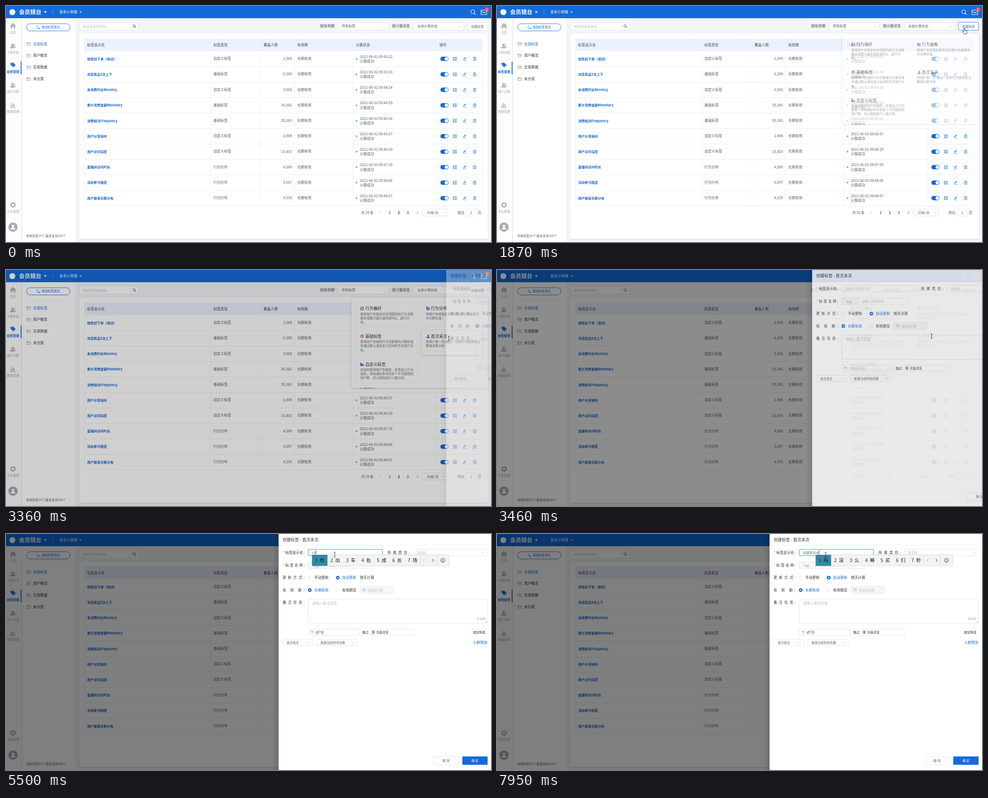
Write an HTML page that moves like this. It is 1073x522 px and loops after 8 s.

```html
<!DOCTYPE html>
<html>
<head>
<meta charset="utf-8">
<title>标签管理</title>
<style>
html, body { margin: 0; width: 100%; height: 100%; overflow: hidden; background: #f4f5f6; }
svg { display: block; width: 1073px; height: 522px; }
text { font-family: "Noto Sans CJK SC", "Noto Sans CJK", "Noto Sans", sans-serif; white-space: pre; }
</style>
</head>
<body>
<svg id="stage" viewBox="0 0 1073 522"></svg>
<script>
const BLUE = '#136bdb', INK = '#55585e', DARK = '#303133', HINT = '#b9bdc5', LINE = '#dcdfe6', GREY = '#b4b6ba';
const LOOP = 8000;

// Text is placed by its left (or anchor) x and its vertical middle.
const text = (x, y, s, size = 7.8, fill = INK, more = '') =>
  `<text x="${x}" y="${y + size * 0.37}" font-size="${size}" fill="${fill}" ${more}>${s}</text>`;
const BOLD = 'font-weight="700"', MID = 'text-anchor="middle"', END = 'text-anchor="end"';
const rect = (x1, y1, x2, y2, fill = '#fff', stroke = 'none', r = 0, more = '') =>
  `<rect x="${x1}" y="${y1}" width="${x2 - x1}" height="${y2 - y1}" fill="${fill}" stroke="${stroke}" rx="${r}" ${more}/>`;
const field = (x1, y1, x2, y2, fill = '#fff', more = '') =>
  rect(x1 + 0.5, y1 + 0.5, x2 - 0.5, y2 - 0.5, fill, LINE, 1.5, `stroke-width=".8" ${more}`);
const line = (d, stroke = INK, w = 0.9, more = '') =>
  `<path d="${d}" fill="none" stroke="${stroke}" stroke-width="${w}" ${more}/>`;
const shape = (d, fill, more = '') => `<path d="${d}" fill="${fill}" ${more}/>`;
const dot = (x, y, r, fill, more = '') => `<circle cx="${x}" cy="${y}" r="${r}" fill="${fill}" ${more}/>`;
const group = (id, body, more = '') => `<g id="${id}" ${more}>${body}</g>`;
const at = (x, y, body) => `<g transform="translate(${x} ${y})">${body}</g>`;
const chevron = (x, y, fill = '#b4b8c0') => line(`M${x - 2.7} ${y - 1.2}l2.7 2.6 2.7-2.6`, fill, 0.8);
const spread = (x, y, s, pitch, size = 7.8) =>
  [...s].map((c, i) => text(x + i * pitch, y, c, size, DARK)).join('');
const calendar = (x, y) => line(`M${x - 2.8} ${y - 2.3}h5.6v5h-5.6zM${x - 2.8} ${y - 0.5}h5.6M${x - 1.3} ${y - 3.2}v1.6M${x + 1.3} ${y - 3.2}v1.6`, '#a9adb5', 0.7);
const lens = (x, y, r, stroke, w) =>
  `<circle cx="${x}" cy="${y}" r="${r}" fill="none" stroke="${stroke}" stroke-width="${w}"/>` +
  line(`M${x + r * 0.7} ${y + r * 0.7}l${r * 0.8} ${r * 0.8}`, stroke, w * 1.3);
const person = (x, y, k, fill) => at(x, y, `<g transform="scale(${k})">` + dot(0, -2.4, 2.7, fill) + shape('M-5 5.2c0-6.4 10-6.4 10 0z', fill) + '</g>');

function header() {
  return rect(0, 0, 1073, 27, BLUE) + dot(14, 13.5, 6.6, '#fff') +
    text(29, 13.5, '会员镜台', 12.3, '#fff', BOLD) + shape('M83.5 11.8h7l-3.5 3.6z', '#fff') +
    rect(103.5, 8, 104.3, 19, '#6ba4ee') +
    text(118, 13.5, '青禾小商铺', 7.9, '#fff', 'font-weight="500"') + shape('M162.5 12.3h5l-2.5 2.6z', '#fff') +
    lens(1032.5, 12.7, 4.2, '#fff', 1.1) +
    line('M1051 9h12.5v10h-12.5zM1051 13h4l1 1.6h3l1-1.6h3.5', '#fff', 1.1) +
    dot(1064, 8, 5, '#f4545b') + text(1064, 8, '1', 7, '#fff', MID);
}

function rail() {
  const tag = shape('M-6-4.5l5-1.5 5.6 5.6-4.4 4.6-5.8-5.6z', BLUE) + line('M0-6l6 5.8-4.6 5', BLUE, 1) + dot(-3, -2.7, 0.9, '#fff');
  const pair = person(2.5, 0, 0.85, '#cfd0d3') + person(-1.5, 0.3, 1, GREY);
  const bars = line('M-4.5 4.5v-5M-1-4.5v9M2.5 4.5v-6', GREY, 2.2) + line('M-6.5 5.8h13', GREY, 1.2);
  const house = shape('M0-6.5l7 6.3h-2v6.2h-3.5v-4h-3v4H-5V-.2h-2z', GREY);
  const gear = `<circle r="4" fill="none" stroke="${GREY}" stroke-width="2.8"/><circle r="5.6" fill="none" stroke="${GREY}" stroke-width="1.8" stroke-dasharray="2.93"/>`;
  const items = [[44, house, '主页'], [88, pair, '人群实验'], [131, tag, '标签管理'], [175, pair, '用户分群'], [219, bars, '数据管理'], [440, gear, '平台管理']];
  return rect(0, 27, 34, 522, '#fcfcfc') + rect(34, 27, 35.5, 522, '#e4e5e7') +
    items.map(([y, icon, name], i) => at(15.5, y, icon) +
      text(15.5, y + 14.3, name, 6.8, i == 2 ? BLUE : '#a3a5a9', MID + (i == 2 ? ' ' + BOLD : ''))).join('') +
    rect(32.5, 123, 34.3, 151, BLUE) + dot(15.5, 489, 10.3, '#aaacb1') + person(15.5, 489, 1, '#fff');
}

function sidebar() {
  const names = ['全部标签', '用户概览', '交易数据', '未分类'];
  return rect(35.5, 27, 153, 522, '#fff') +
    rect(45.5, 39.2, 141.7, 55.2, '#fff', BLUE, 8, 'stroke-width=".9"') +
    line('M72 44h-3.2v5.6h5.4v-3M72.5 49.6h3M74 48v3', BLUE, 0.7) + text(79, 47, '增加标签类目', 6.7, BLUE) +
    rect(46, 66.8, 142, 67.5, '#ebedf0') +
    names.map((n, i) => {
      const y = 83.7 + i * 25.8;
      return line(`M46.2 ${y - 3.3}h2.8l1 1.3h3.8v5.4h-7.6zM46.2 ${y - 0.8}h7.6`, i ? '#777a80' : '#6c7c94', 0.7) + text(60, y, n, 7.9, i ? DARK : BLUE);
    }).join('') + text(45, 509, '有效标签29个/最多支持200个', 6.6, INK);
}

const ROW = 34.23, rowTop = i => 99.8 + i * ROW;
const rows = [
  ['按性别下单（测试）', 0, '2,569', '43:22'], ['浏览商品5次上下', 1, '6,285', '43:53'],
  ['未消费时长Recency', 0, '3,565', '44:24'], ['累计消费金额Monetary', 1, '35,381', '44:55'],
  ['消费频次Frequency', 1, '35,381', '45:26'], ['用户分享倾向', 0, '1,908', '45:57'],
  ['用户访问深度', 0, '15,453', '46:29'], ['直播间访问时长', 2, '4,585', '47:35'],
  ['活动参与程度', 2, '5,697', '48:06'], ['用户登录天数分布', 2, '4,535', '48:37']];
const kinds = ['自定义标签', '基础标签', '行为分布'];

function rowTools(y) {
  return rect(961, y - 4.8, 979, y + 4.8, BLUE, 'none', 4.8) + dot(974.2, y, 3.8, '#fff') +
    at(993, y, line('M-3.6-3.5h2.6v2.6h-2.6zM1-3.5h2.6v2.6H1zM-3.6 1h2.6v2.6h-2.6zM1 1h2.6v2.6H1z', BLUE, 0.8)) +
    at(1014.5, y, line('M-3.6 3.8h7.4', BLUE, 0.7) + shape('M-3 2.2l.6-2.2 4.4-3.8 1.4 1.5-4.2 4z', BLUE, 'opacity=".75"')) +
    at(1036.8, y, line('M-3.6-2.2h7.2M-1.3-2.4v-1.2h2.6v1.2M-2.8-2v5.6h5.6v-5.6M-1-.4v2.6M1-.4v2.6', BLUE, 0.75));
}

function table() {
  const heads = [[179.5, '标签显示名'], [459, '标签类型'], [570, '覆盖人数'], [644.5, '有效期'], [774, '计算状态'], [959, '操作']];
  const body = rows.map(([name, kind, count, time], i) => {
    const y = 116.9 + i * ROW;
    return text(179.5, y, name, 7.3, '#1663cf', BOLD) + text(459, y - 0.7, kinds[kind]) +
      text(633, y - 0.7, count, 8, INK, END) + text(644.5, y - 0.7, '长期有效') +
      dot(775.5, y, 1.7, '#2fc18f') + text(783, y - 5, '2021-06-02 09:' + time) + text(783, y + 5.2, '计算成功') +
      rowTools(y) + rect(174, rowTop(i + 1) - 0.4, 1054, rowTop(i + 1) + 0.4, '#e6e9ef');
  }).join('');
  const bottom = rowTop(10);
  return rect(162, 61, 1066, 515, '#fff', 'none', 1, 'filter="url(#soft)"') + rect(174, 72, 1054, 99.8, '#ebf1fd') +
    rect(174, 0, 1054, ROW, '#f5f7fa', 'none', 0, 'id="hover"') +
    [174, 453, 564, 638, 768, 953, 1054].map(x => rect(x - 0.4, 72, x + 0.4, bottom, '#ebeef4')).join('') +
    heads.map(([x, s]) => text(x, 86, s, 7.8, '#44474d', 'font-weight="500"')).join('') + body;
}

function pager() {
  return text(786, 457, '共 29 条', 7.6) + line('M828.8 454.3l-2.7 2.7 2.7 2.7', '#b4b8c0', 0.9) +
    [1, 2, 3].map(n => text(829 + n * 20, 456.7, n, 7.6, n == 2 ? DARK : '#2560b8', MID + ' ' + BOLD)).join('') +
    line('M909 454.3l2.7 2.7-2.7 2.7', INK, 0.9) + field(921, 448.5, 978, 465) + text(931, 457, '10条/页', 7.4) + chevron(969.5, 457) +
    text(999, 457, '前往', 7.6) + field(1016, 448.5, 1042, 465) + text(1029, 457, '1', 7.6, INK, MID) + text(1044, 457, '页', 7.6);
}

function toolbar() {
  return field(162, 35.5, 293.5, 54) + rect(274.8, 36, 275.5, 53.5, LINE) + text(170, 45, '按标签名称查找...', 7.4, HINT) + lens(283.3, 44, 2.6, '#44474d', 0.9) +
    text(695, 44.5, '按有效期', 8, '#44474d') + field(735, 35.5, 846.5, 54) + text(743, 44.5, '所有标签', 7.5) + chevron(836.5, 45.5) +
    text(854, 44.5, '按计算状态', 7.9, '#44474d') + field(901, 35.5, 1013, 54) + text(910, 44.5, '全部计算状态', 7.4) + chevron(1003.5, 45.5) +
    field(1020.5, 35.5, 1066, 54, '#fff', 'id="createBox"') + text(1043.2, 45, '创建标签', 7, INK, MID + ' id="createText"');
}

function popup() {
  const cards = [
    [774, 72, '行为偏好', '#c9639f', ['使用用户在指定时间范围内的行为次数', '最多或累计最大值的前N位，进行分', '布。']],
    [919, 72, '行为分布', '#4b62c4', ['将用户完成指定事件的天数分布结果作', '为分群标准。']],
    [774, 133.7, '基础标签', '#e0685c', ['使用用户完成的行为次数做为计数标准', '并通过默认或自定义区间的方式进行分', '布。']],
    [919, 133.7, '首次末次', '#3f7fd0', ['将用户第一次/最后一次的行为按具体日', '期或天数分布']],
    [774, 195.3, '自定义标签', '#3566c9', ['自由的使用用户的属性、标签加上行为', '指标。得到满足条件的多个不同规则的', '用户数，并以规则进行人数分布。']]];
  const icons = [
    c => dot(0, 0, 3, 'none', `stroke="${c}" stroke-width="2"`) + dot(-2, 2.5, 1.4, '#6a7be0'),
    c => shape('M0 0v-4a4 4 0 0 0-4 4z', c) + shape('M.8 0v-3.4a4 4 0 1 1-4 4.2z', '#7f93de'),
    c => dot(0, -0.5, 2.7, 'none', `stroke="${c}" stroke-width="1.9"`) + shape('M-1.4 2h2.8l-1.4 2.4z', c),
    c => person(1, 0, 0.72, c) + rect(-4, 1.5, -1, 3.6, '#8fb7ea'),
    c => shape('M-4 3.6v-7h2.4v3h2.4v2h3.4v2z', c) + rect(1.2, -1.6, 3.6, 1, '#8fb7ea')];
  return rect(764, 61, 1066, 260.5, '#fff', 'none', 2, 'filter="url(#deep)"') +
    rect(919, 133.7, 1054, 187.7, '#fff', 'none', 1, 'id="cardHover" filter="url(#deep)"') +
    cards.map(([x, y, name, color, lines], i) =>
      rect(x, y, x + 136, y + 54, 'none', '#f1f2f5', 1, 'stroke-width=".8"') + at(x + 14, y + 13, icons[i](color)) +
      text(x + 21, y + 13, name, 9, DARK) +
      lines.map((s, k) => text(x + 9.7, y + 25 + k * 9.2, s, 6.95, '#6b6e74')).join('')).join('');
}

const radio = (x, y, on) => on
  ? dot(x, y, 4, BLUE) + dot(x, y, 1.5, '#fff')
  : dot(x, y, 3.7, '#fff', `stroke="${LINE}" stroke-width=".8"`);

function drawer() {
  const star = y => text(612.5, y, '*', 7.5, '#f25c5c');
  const colon = y => text(658.6, y, ':', 7.8, DARK);
  return rect(589, 0, 603, 522, 'url(#edge)') + rect(603, 0, 1073, 522, '#fff') +
    text(612, 13, '创建标签 - 首次末次', 9, DARK, 'font-weight="500"') + rect(603, 24, 1073, 24.7, '#eff0f2') +
    star(41.5) + text(618, 41, '标签显示名', 7.9, DARK) + colon(41) +
    field(668, 33.5, 833.5, 48.5, '#fff', 'id="nameBox"') + text(677, 41, '请输入标签显示名', 6.9, HINT, 'id="nameHint"') +
    text(677, 41, '', 7, '#606266', 'id="nameText"') + rect(677, 36, 677.9, 46, '#222', 'none', 0, 'id="caret"') +
    spread(844, 41, '所属类目', 12) + text(891, 41, ':', 7.8, DARK) + field(900.5, 33.5, 1065.5, 48.5) + text(909, 41, '请选择', 7, HINT) + chevron(1056, 41) +
    star(69.5) + spread(618, 69, '标签名称', 10.3) + colon(69) +
    field(668, 61.5, 814.5, 76.5) + field(668, 61.5, 705.5, 76.5, '#f5f7fa') + text(686.5, 69, 'tag_', 7, '#90939a', MID) + text(713, 69, '请输入标签名称', 6.9, HINT) +
    spread(612, 96, '更新方式', 11.8) + colon(96) + radio(672, 96.5) + text(682, 96, '手动更新', 7.9, DARK) +
    radio(734, 96.5, 1) + text(743.5, 96, '自动更新', 7.9, BLUE) + text(783, 96, '按天计算', 7.9, DARK) +
    spread(612, 124, '有效期', 17) + colon(124) + radio(672, 124, 1) + text(682, 124, '长期有效', 7.9, BLUE) +
    radio(734, 124) + text(743.5, 124, '有效期至', 7.9, DARK) +
    field(782.5, 116, 857, 131.5, '#f5f7fa') + calendar(792.5, 123.7) + text(800, 124, '请选择日期', 6.8, HINT) +
    spread(612, 151, '备注信息', 11.8) + colon(151) + field(668, 143.5, 1065.5, 198) + text(677, 153.5, '请输入备注信息', 7.9, HINT) +
    text(1060, 187.5, '0/120', 6.9, '#7b7e84', END) + line('M1059.8 196.5l4.3-4.3M1062 196.7l2.2-2.2', '#999', 0.7) +
    field(668, 210, 783, 224.5) + calendar(677, 217) + text(685, 217.3, '', 7, DARK, 'id="range"') + text(788, 217.3, '做过', 7, DARK) +
    field(807, 210, 902, 224.5) + line('M810.6 214.2h5.2M810.8 216.3h4.6M811 214v6.4h2.6l2-3.4M812.8 217v3', '#44474d', 0.9) + text(819, 217.3, '页面浏览', 6.8, DARK) +
    rect(1027.5, 210.5, 1066, 224, '#fff', '#f0f1f3', 6.5, 'stroke-width=".8"') + text(1033, 217.3, '增加筛选', 6.8, DARK) +
    field(612, 232, 679.5, 247) + text(621, 240, '首次发生', 6.8) + chevron(670, 240) +
    field(687, 232, 777.5, 247) + text(696, 240, '距离当前时间天数', 6.8) + chevron(767.5, 240) + text(1033.5, 240, '人群预测', 7.8, BLUE) +
    field(945.5, 492, 1001.5, 510.5) + text(973.5, 501.5, '取 消', 7, INK, MID) +
    rect(1009.5, 492, 1065.5, 510.5, BLUE, 'none', 1.5) + text(1037.5, 501.5, '确 定', 7, '#fff', MID);
}

// Candidate bar of the input method, its left edge at x.
function candidates(x, words) {
  let right = x, cells = '';
  words.split(' ').forEach((w, i) => {
    const width = 23.7 + 10.5 * w.length;
    if (!i) cells += rect(right, 46, right + width, 70.5, '#2f8aa6');
    cells += text(right + 6.8, 58.5, i + 1, 10, '#222') + text(right + 17.3, 58.5, w, 10.5, '#111');
    right += width;
  });
  const smile = dot(right + 50, 58.3, 4.5, 'none', 'stroke="#222" stroke-width=".9"') + dot(right + 48.4, 57, 0.7, '#222') + dot(right + 51.6, 57, 0.7, '#222') +
    line(`M${right + 47.6} 59.6q2.4 2.6 4.8 0`, '#222', 0.8);
  return rect(x, 46, right + 64, 70.5, '#f3f3f3', '#d6d6d6', 0, 'stroke-width=".8"') + cells +
    rect(right, 46, right + 0.7, 70.5, '#d6d6d6') + rect(right + 36, 46, right + 36.7, 70.5, '#d6d6d6') +
    line(`M${right + 9.6} 55l-3.2 3.3 3.2 3.3`, '#aaa', 1) + line(`M${right + 26.4} 55l3.2 3.3-3.2 3.3`, '#222', 1) + smile;
}

// time, accepted text, letters being typed, candidates
const typing = [
  [0, '', '', ''],
  [5340, '', 'c', '才 从 出 此 次 吃 车'],
  [5440, '', 'ch', '吃 出 车 处 成 长 场'],
  [5690, '', 'chu', '出 处 出去 除 初 触 楚'],
  [5790, '', 'chua', '传 创 穿 窗 船 川 创建'],
  [5960, '', 'chuan', '传 穿 传说 船 串门 川 传统'],
  [6080, '', 'chuang', '创 床 窗户 闯 创业 窗 创新'],
  [6190, '', "chuang'j", '创建 创举 窗 创 闯将 床 窗帘'],
  [6290, '', "chuang'ji", '创建 创举 创 创纪 闯 创业 床'],
  [6490, '', "chuang'jia", '创建 创价 床架 窗架 闯 创业 创家'],
  [6720, '', "chuang'jian", ''],
  [6790, '', "chuang'jian", '创建 窗间 床间 创建者 创见 闯荐 床肩'],
  [6980, '创建', '', ''],
  [7060, '创建', 's', '是 时 三 上 说 所 随'],
  [7130, '创建', 'sh', '是 上 时 说 使 收 十'],
  [7210, '创建', 'sho', '手 首 收 受 守 瘦 售'],
  [7280, '创建', 'shou', '手 首 收 受 守 瘦 售'],
  [7350, '创建', "shou'c", '手册 首次 收 手 首 受 守'],
  [7420, '创建', "shou'ci", '首次 授此 手 首 收 受 守'],
  [7680, '创建首次', '', ''],
  [7950, '创建首次', 'm', '吗 没 么 嘛 买 们 秒']];

const path = [[0, 1037, 530], [20, 1037, 522], [400, 1035, 330], [820, 1037, 136], [1250, 1035, 62], [1630, 1034, 48.5],
  [2200, 1034, 48.5], [2540, 1000, 138], [2660, 986.5, 154], [3290, 986.5, 154], [3360, 980, 151.5], [3460, 962, 146.5], [3750, 800, 75], [4050, 727, 45.5], [LOOP, 727, 45.5]];
const pointers = {
  arrow: shape('M0 0v11l2.6-2.3 1.8 4 1.8-.8-1.8-3.9h3.5z', '#fff', 'stroke="#222" stroke-width=".8"'),
  hand: shape('M-1 1c0-1.3 2-1.3 2 0v4.2l4 1c1 .3 1.3 1 1.2 2l-.6 2.8-.8 2.4h-5.2l-3.2-4.6c-.7-1.2.6-1.9 1.4-1l1.2 1.2z', '#fff', 'stroke="#222" stroke-width=".9"'),
  beam: line('M-2-5.2h1.4l.6.6.6-.6h1.4M0-4.6v9.2M-2 5.2h1.4l.6-.6.6.6h1.4', '#222', 0.9)
};

const shadow = (id, blur, alpha) =>
  `<filter id="${id}" x="-10%" y="-10%" width="120%" height="125%"><feDropShadow dx="0" dy="1" stdDeviation="${blur}" flood-opacity="${alpha}"/></filter>`;
const stage = document.getElementById('stage');
stage.innerHTML = `<defs>${shadow('soft', 1.2, 0.14)}${shadow('deep', 2.8, 0.2)}
  <linearGradient id="edge"><stop offset="0" stop-opacity="0"/><stop offset="1" stop-opacity=".14"/></linearGradient></defs>` +
  rect(0, 0, 1073, 522, '#f4f5f6') + rail() + sidebar() + toolbar() + table() + pager() + header() +
  group('popup', popup()) + rect(0, 0, 1073, 522, '#000', 'none', 0, 'id="mask"') +
  group('drawer', drawer()) + group('bar', '') + dot(727, 45, 5.6, '#f3ea2c', 'id="halo" opacity=".85"') +
  group('pointer', Object.entries(pointers).map(([k, v]) => group(k, v)).join(''));

const el = id => document.getElementById(id);
const set = (id, attrs) => { for (const k in attrs) el(id).setAttribute(k, attrs[k]); };
const show = (id, on) => set(id, { visibility: on ? 'inherit' : 'hidden' });
const ramp = (t, a, b) => Math.min(1, Math.max(0, (t - a) / (b - a)));
const smooth = p => p * p * (3 - 2 * p);

function pointerAt(t) {
  const i = Math.max(1, path.findIndex(p => p[0] > t));
  const [t0, x0, y0] = path[i - 1], [t1, x1, y1] = path[i], p = ramp(t, t0, t1);
  return [x0 + (x1 - x0) * p, y0 + (y1 - y0) * p];
}

let typed = -1;
function drawTyping(t) {
  const i = typing.findLastIndex(s => s[0] <= t);
  if (i == typed) return;
  typed = i;
  const [, done, letters, words] = typing[i], box = el('nameText');
  box.textContent = done;
  const start = 677 + (done ? box.getComputedTextLength() : 0);
  box.textContent = done + letters;
  const end = 677 + (done + letters ? box.getComputedTextLength() : 0);
  set('caret', { x: end + 0.2 });
  show('nameHint', !(done + letters));
  el('bar').innerHTML = words ? candidates(start, words) : '';
}

function draw(t) {
  const [x, y] = pointerAt(t);
  const kind = t < 1400 ? 'arrow' : t < 2400 ? 'hand' : 'beam';
  set('pointer', { transform: `translate(${x} ${y})` });
  for (const k in pointers) show(k, k == kind);

  const row = Math.floor((y - rowTop(0)) / ROW);
  show('hover', t < 1200 && row >= 0 && row < 10);
  set('hover', { y: rowTop(row) });

  const active = t >= 1500 && t < 2600;
  set('createBox', { stroke: active ? BLUE : LINE });
  set('createText', { fill: active ? BLUE : INK });
  set('popup', { opacity: ramp(t, 1760, 1940) });
  show('cardHover', t >= 2520);

  const slide = smooth(ramp(t, 3290, 3530));
  set('mask', { opacity: 0.5 * ramp(t, 3290, 3480) });
  set('drawer', { transform: `translate(${470 * (1 - slide)} 0)`, opacity: ramp(t, 3290, 3500) });
  const loaded = t >= 3620;
  el('range').textContent = loaded ? '近7日' : '请选择日期';
  set('range', { fill: loaded ? DARK : HINT });

  set('nameBox', { stroke: t < 4050 ? LINE : t < 4500 ? '#a9adb4' : BLUE });
  show('halo', t >= 4170 && t < 4510);
  show('caret', t >= 4320 && t < 4850 || t >= 5340);
  drawTyping(t);
}

const begin = performance.now();
function tick() {
  draw((performance.now() - begin) % LOOP);
  requestAnimationFrame(tick);
}
tick();
</script>
</body>
</html>
```
